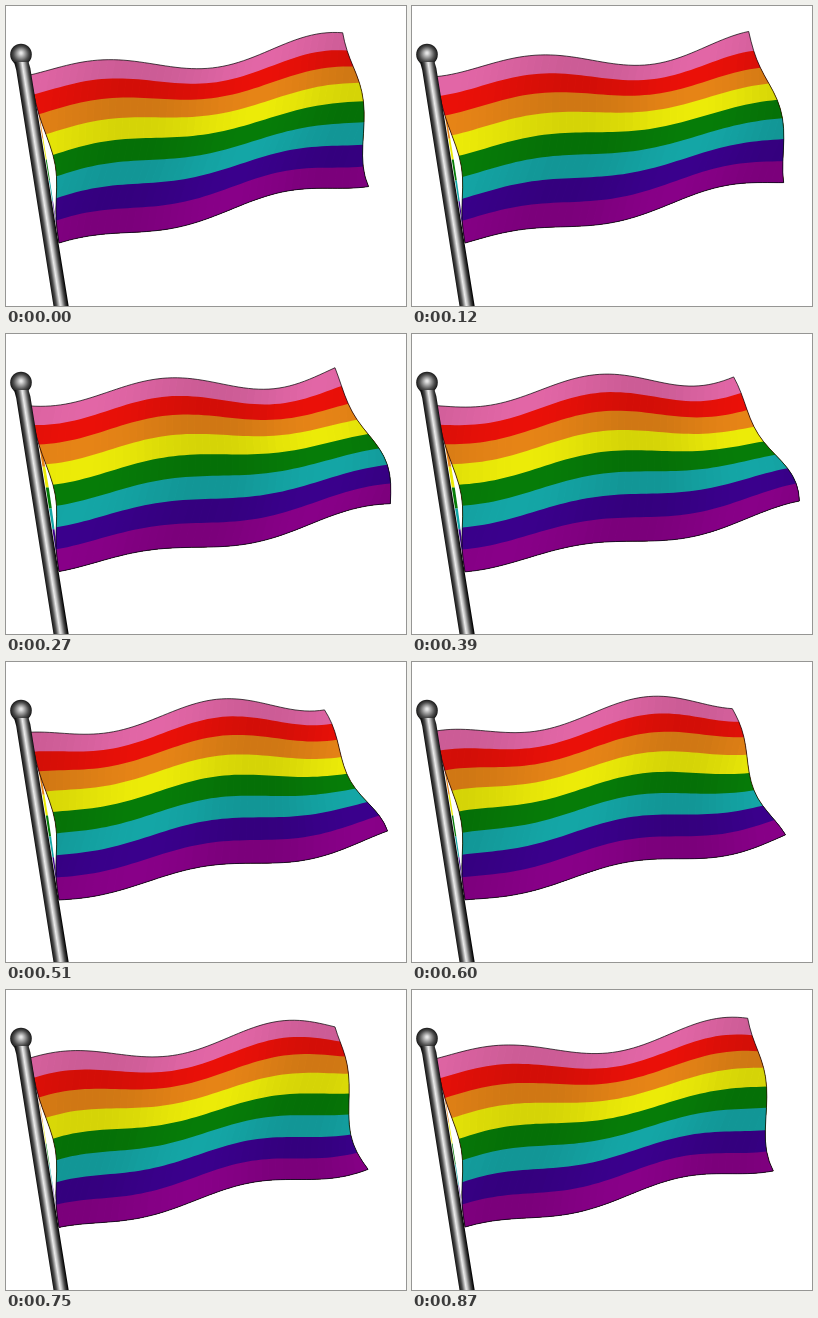
Write an HTML page with a canvas that moves like this. It is 400 px wide and 300 px high and loops after 0.9 s.

```html
<!DOCTYPE html>
<html lang="en">
<head>
<meta charset="utf-8">
<title>Waving flag</title>
<style>
  html, body { margin: 0; width: 100%; height: 100%; overflow: hidden; background: #fff; }
  canvas { display: block; width: 400px; height: 300px; }
</style>
</head>
<body>
<canvas id="stage" width="400" height="300"></canvas>
<script>
const ctx = document.getElementById('stage').getContext('2d');
const LOOP = 900, STEP = 30;
const STRIPES = ['#e266a6', '#ea1008', '#e68416', '#eceb08',
  '#067c08', '#14a6a6', '#3a008c', '#880088'];

const wave = (t, peak) => Math.cos((t - peak) / LOOP * 2 * Math.PI);
const mix = (a, b, k) => a + (b - a) * k;
const range = (n, f) => Array.from({ length: n + 1 }, (_, i) => f(i / n));

// Time at which the travelling wave is lowest, later towards the fly and the foot
const lowest = (u, v) => 300 + 900 * u + 230 * u * u + v * (190 + 130 * u);

// Point of the cloth: u from hoist to fly, v from top to bottom
function point(u, v, t) {
  const bell = Math.sin(Math.PI * v);
  const grip = (1 - u) ** 6;

  const topX = mix(24, 328 + 9.5 * wave(t, 60), u);
  const footX = mix(53, 374 + 13.5 * wave(t, 370), u);
  const hoistX = 9 * Math.sin(Math.PI * v ** 1.2) ** 3;
  const flyX = bell * (.5 + 21 * v * wave(t, 420 * v - 95));

  const topY = 70 - 33.5 * u + (11.5 - 9.5 * grip) * wave(t, lowest(u, 0));
  const footY = 237.5 - 57 * u - 6.5 * u * u + (7 - 6.5 * grip) * wave(t, lowest(u, 1));
  const sag = mix(-4, -2.5, u) - 19 * u * (1 - u) + 6 * u ** 4 * wave(t, 190 + 570 * v);

  return [mix(topX, footX, v) + mix(hoistX, flyX, u), mix(topY, footY, v) + bell * sag];
}

function trace(points) {
  ctx.beginPath();
  points.forEach(([x, y]) => ctx.lineTo(x, y));
  ctx.closePath();
}

function fill(points, style) {
  trace(points);
  ctx.fillStyle = style;
  ctx.fill();
}

// Outline of the cloth between two heights
const band = (v0, v1, t) => [
  ...range(60, u => point(u, v0, t)),
  ...range(16, k => point(1, mix(v0, v1, k), t)),
  ...range(60, u => point(1 - u, v1, t)),
  ...range(16, k => point(0, mix(v1, v0, k), t))
];

// Soft dark folds that lean with the wave
function drawFolds(t) {
  const count = 60, width = 1.4 / count;
  const lean = (u, v) => point(u + .2 * (.5 - v), v, t);
  for (let i = 0; i < count; i++) {
    const u = mix(-.2, 1.2, i / count);
    const dark = .05 - .05 * wave(t, lowest(u, .5) - 200);
    fill([...range(8, v => lean(u, v)), ...range(8, v => lean(u + width, 1 - v))],
      `rgba(0,0,0,${dark})`);
  }
}

function drawCloth(t) {
  // Each stripe reaches down to the foot, so no seam shows below it
  STRIPES.forEach((color, i) => fill(band(i / 8, 1, t), color));
  ctx.save();
  trace(band(0, 1, t));
  ctx.clip();
  drawFolds(t);
  ctx.restore();
  trace(band(0, 1, t));
  ctx.strokeStyle = 'rgba(0,0,0,.7)';
  ctx.lineWidth = 1;
  ctx.stroke();
}

// Narrow strip of cloth showing beside the pole
function drawSleeve(t) {
  const width = 1.8 + 1.3 * wave(t, 330);
  const spot = (v, side) => {
    const y = mix(70, 237, v);
    return [25 + (y - 60) * .158 + side * width * Math.sin(Math.PI * v), y];
  };
  STRIPES.forEach((color, i) => {
    const v0 = i / 8, v1 = (i + 1) / 8;
    fill([spot(v0, 0), spot(v0, 1), spot(v1, 1), spot(v1, 0)], color);
  });
}

function addStops(gradient, stops) {
  stops.forEach(([at, color]) => gradient.addColorStop(at, color));
  return gradient;
}

function drawPole() {
  ctx.beginPath();
  ctx.arc(15, 48.5, 10.8, 0, 2 * Math.PI);
  ctx.fillStyle = addStops(ctx.createRadialGradient(15, 47, 1, 15, 48.5, 10.8), [
    [0, '#e4e4e4'], [.3, '#a0a0a0'], [.65, '#505050'], [1, '#161616']
  ]);
  ctx.fill();
  fill([[8, 56], [22.5, 56], [24.3, 62], [63, 302], [47.8, 302], [10.2, 64]],
    addStops(ctx.createLinearGradient(10, 61, 24, 58.8), [
      [0, '#101010'], [.2, '#4c4c4c'], [.47, '#ececec'], [.58, '#c8c8c8'],
      [.82, '#484848'], [1, '#060606']
    ]));
}

function draw(t) {
  ctx.fillStyle = '#fff';
  ctx.fillRect(0, 0, 400, 300);
  drawSleeve(t);
  drawCloth(t);
  drawPole();
}

const start = performance.now();
function tick() {
  const now = performance.now() - start;
  draw(Math.floor(now % LOOP / STEP) * STEP);
  requestAnimationFrame(tick);
}
tick();
</script>
</body>
</html>
```
